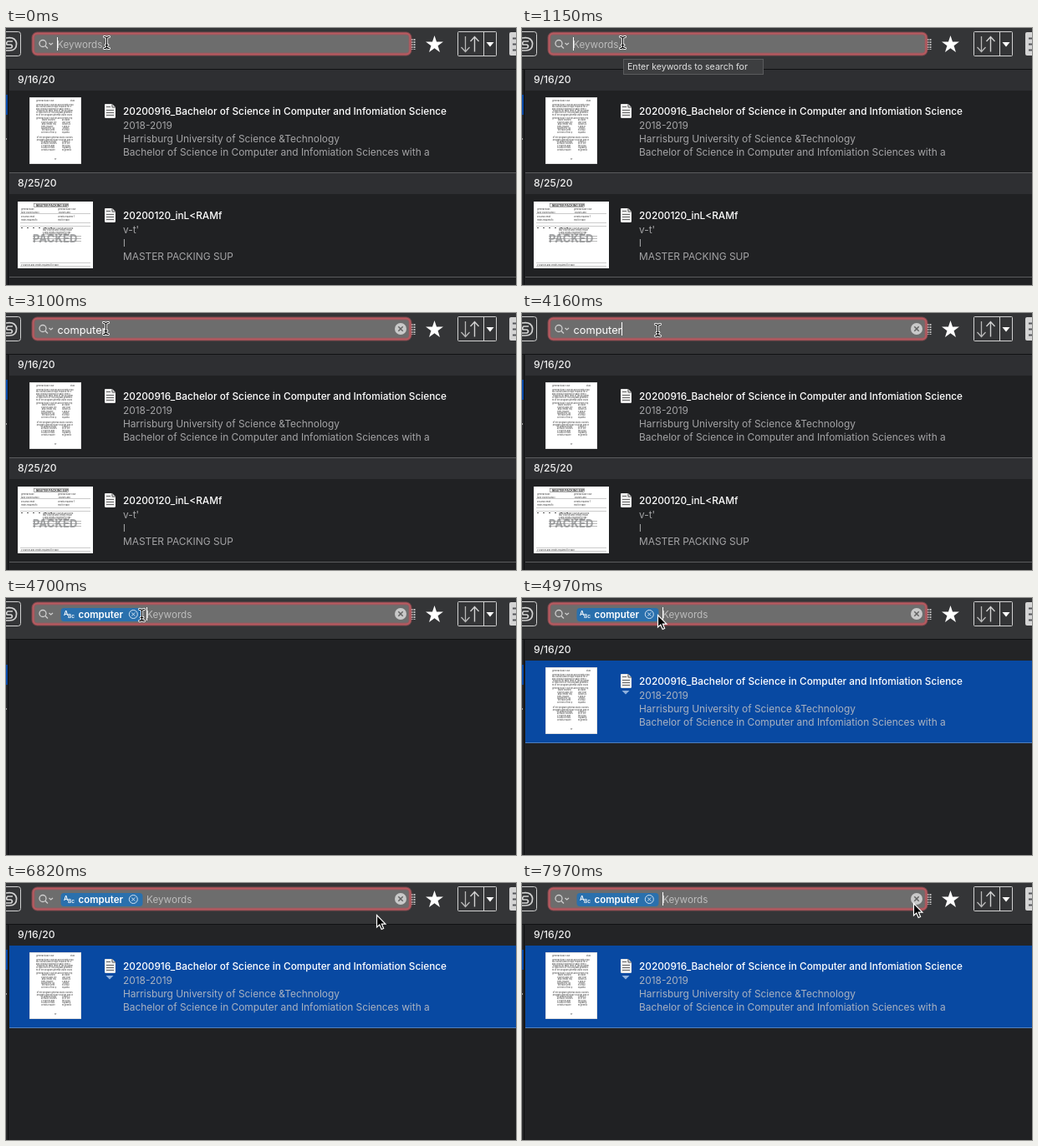
Animation, 610 px wide and 308 px high, one loop 8 s. Source, as an HTML page:

```html
<!DOCTYPE html>
<html lang="en">
<head>
<meta charset="utf-8">
<title>Keyword search</title>
<style>
  html, body { margin: 0; width: 100%; height: 100%; overflow: hidden; background: #202123; }
  svg { display: block; }
  text { font: 11.9px Inter, "Open Sans", sans-serif; fill: #a4a4a6; white-space: pre; }
  .title { font-size: 11.82px; font-weight: 500; fill: #fff; }
  .date { font-size: 12.1px; font-weight: 500; fill: #f2f2f2; }
  .hint { font-size: 11.7px; fill: #bdbdbd; }
  .typed { font-size: 12.8px; fill: #fff; }
  .token { font-size: 11.5px; font-weight: 600; fill: #fff; }
  .tiny { font-size: 2.4px; font-weight: 500; fill: #444; }
  .selected text:not(.title):not(.date):not(.tiny) { fill: #a9b2c1; }
</style>
</head>
<body>
<svg width="610" height="308" viewBox="0 0 610 308">
  <defs>
    <g id="page">
      <path d="M119 91H127L131 95V106.500Q131 108 129.500 108H119.500Q118 108 118 106.500V92Q118 91 119 91Z" fill="#ececec"/>
      <path d="M127 91V95H131" fill="none" stroke="#555"/>
      <path d="M120 94.500H125M120 98.500H129M120 101.500H129M120 104.500H129" stroke="#666"/>
    </g>
  </defs>

  <rect width="610" height="308" fill="#202123"/>
  <rect width="610" height="49" fill="#343537"/>
  <rect y="49" width="610" height="1" fill="#111213"/>
  <rect y="50" width="2" height="258" fill="#28292b"/>
  <rect x="2" y="50" width="1" height="258" fill="#0e0f10"/>
  <rect y="80" width="2" height="24" fill="#0849a8"/>
  <rect y="132" width="1" height="2" fill="#999"/>

  <!-- toolbar -->
  <g fill="none" stroke="#d2d2d2">
    <path d="M0 4.500H14.500Q17.500 4.500 17.500 7.500V30.500Q17.500 33.500 14.500 33.500H0"/>
    <path d="M0 12Q11 10 12.500 18Q13 27 4 27H0M8 16H2Q-1 19 2 20H6Q9 22 6 24H0" stroke-width="1.700"/>
    <rect x="540.500" y="4.500" width="46" height="29" rx="1"/>
    <path d="M571.500 5V33"/>
    <path d="M549.500 10V28M544.500 23L549.500 28.500L554.500 23" stroke="#b8b8b8" stroke-width="1.300"/>
    <path d="M560.500 28.500V10.500M555.500 16L560.500 10.500L565.500 16" stroke-width="1.400"/>
    <path d="M485.500 13V26M488.500 13V26" stroke="#bdbdbd" stroke-width="2" stroke-dasharray="2 1"/>
  </g>
  <path d="M574.500 17H583.500L579 22.500Z" fill="#fff"/>
  <path id="star" fill="#fff"/>
  <rect x="602" y="5" width="12" height="28" rx="2" fill="#d4d4d4"/>
  <path d="M606 12.500H610M606 19.500H610M606 26.500H610" stroke="#55565a" stroke-width="2"/>

  <!-- search field -->
  <rect x="32.500" y="6.500" width="451" height="25" rx="5" fill="#6d6d6d" stroke="#a9545a" stroke-opacity=".6" stroke-width="4"/>
  <rect x="32.500" y="6.500" width="451" height="25" rx="5" fill="none" stroke="#b85a60" stroke-width="2"/>
  <g fill="none" stroke="#cfcfcf" stroke-width="1.300">
    <circle cx="44" cy="18.500" r="4"/>
    <path d="M47 21.500L50 24.500M51.500 18L53.700 20L56 18"/>
  </g>
  <g id="clear">
    <circle cx="472" cy="19" r="7" fill="#c9c9c9"/>
    <path d="M469.300 16.300L474.700 21.700M474.700 16.300L469.300 21.700" stroke="#646464" stroke-width="1.500"/>
  </g>
  <g id="token">
    <rect x="65.500" y="12" width="98" height="16" rx="4" fill="#2a70ad"/>
    <text x="69" y="21" class="token" style="font-size:7.500px">A</text>
    <text x="74" y="24" class="token" style="font-size:6.500px">Bc</text>
    <text x="86.500" y="24" class="token">computer</text>
    <circle cx="152.300" cy="19.500" r="5" fill="none" stroke="#d5e5f4"/>
    <path d="M150.300 17.500L154.300 21.500M154.300 17.500L150.300 21.500" stroke="#d5e5f4"/>
  </g>
  <text id="hint" y="24" class="hint">Keywords</text>
  <text id="typed" x="61.500" y="24.500" class="typed"></text>
  <rect id="caret" y="11" width="1" height="16" fill="#fff"/>

  <!-- results -->
  <g id="first">
    <rect x="4" y="50" width="606" height="25" fill="#2e2f32"/>
    <text x="14" y="66" class="date">9/16/20</text>
    <g id="highlight">
      <rect x="4" y="50" width="606" height="25" fill="#232426" style="mix-blend-mode:darken"/>
      <rect x="4" y="75" width="606" height="99" fill="#0849a2"/>
      <path d="M119.500 111H128.500L124 115.500Z" fill="#8fb0dc"/>
      <text x="14" y="66" class="date">9/16/20</text>
    </g>
    <path id="rule" d="M4 173.500H610" stroke="#5b5c5e"/>
    <rect x="28" y="83" width="62" height="80" fill="#c4c4c4"/>
    <rect x="28.500" y="83.500" width="61" height="79" fill="#fff"/>
    <g id="thumbA"></g>
    <use href="#page"/>
    <text x="140" y="104" class="title">20200916_Bachelor of Science in Computer and Infomiation Science</text>
    <text x="140" y="121">2018-2019</text>
    <text x="140" y="137">Harrisburg University of Science &amp;Technology</text>
    <text x="140" y="153">Bachelor of Science in Computer and Infomiation Sciences with a</text>
  </g>
  <g id="second">
    <rect x="4" y="174" width="606" height="25" fill="#2e2f32"/>
    <text x="14" y="190" class="date">8/25/20</text>
    <path d="M4 298.500H610" stroke="#5b5c5e"/>
    <rect x="14" y="208" width="90" height="80" fill="#fff"/>
    <g id="thumbB">
      <rect x="33.500" y="210.500" width="41" height="4" fill="none" stroke="#777" stroke-width=".6"/>
      <text x="36" y="214" class="tiny" style="font-size:3.400px;font-weight:800">MASTER PACKING SUP</text>
      <path d="M17 222.500H101M17 233.500H101M17 237.500H101M17 281.500H101M17 285.500H101" stroke="#b5b5b5" stroke-width=".7"/>
      <path d="M18 239.500H58" stroke="#555" stroke-dasharray="2 5"/>
      <text x="32" y="257" style="font-size:13px;font-weight:800;fill:#a6a8aa">PACKED</text>
      <path d="M32 249.500H90M32 252.500H90M32 255.500H90" stroke="#8a8a8a" stroke-width=".6"/>
    </g>
    <use href="#page" y="125"/>
    <text x="140" y="229" class="title">20200120_inL&lt;RAMf</text>
    <text x="140" y="246">v-t'</text>
    <text x="140" y="262">l</text>
    <text x="140" y="278">MASTER PACKING SUP</text>
  </g>

  <g id="tooltip">
    <rect x="121.500" y="37.500" width="167" height="18" fill="#3d3e40" stroke="#5a5b5d"/>
    <text x="126" y="50" style="font-size:10.600px;fill:#e2e2e2">Enter keywords to search for</text>
  </g>

  <g id="beam" fill="none" stroke-linecap="round">
    <path d="M-3 -7Q0 -7 0 -5V5Q0 7 -3 7M3 -7Q0 -7 0 -5M0 5Q0 7 3 7M-1.500 3H1.500" stroke="#fff" stroke-width="2.800"/>
    <path d="M-3 -7Q0 -7 0 -5V5Q0 7 -3 7M3 -7Q0 -7 0 -5M0 5Q0 7 3 7M-1.500 3H1.500" stroke="#000" stroke-width="1.100"/>
  </g>
  <path id="arrow" d="M0 0V14.500L3.300 11.500L5.700 17L8.100 16L5.800 10.600H10.400Z" fill="#000" stroke="#fff" stroke-width="1.200"/>
</svg>
<script>
const LOOP = 8000, STEP = 86;
const $ = id => document.getElementById(id);

const WORD = "computer";
const keyTimes = [1420, 1680, 1860, 2130, 2390, 2660, 2830, 3100];
const caretToggles = [260, 800, 3640, 4160, 5230, 5770, 6310, 6850, 7440, 7970];
const moves = [
  { at: 2480, steps: 1, to: [120, 18] },
  { at: 2830, steps: 1, to: [119, 18] },
  { at: 3640, steps: 7, to: [162, 20] },
  { at: 5770, steps: 6, to: [242, 45] },
  { at: 6300, steps: 4, to: [437, 41] },
  { at: 6650, steps: 7, to: [468, 24] }
];

$("star").setAttribute("d", "M" + Array.from({ length: 10 }, (_, i) => {
  const r = i % 2 ? 4.3 : 11, a = (i / 5 - 0.5) * Math.PI;
  return [512.5 + r * Math.cos(a), 20 + r * Math.sin(a)].map(v => v.toFixed(2));
}).join("L") + "Z");

function tinyLine(parent, x, y, length, offset) {
  const filler = "general study courses and credits required for each term of the program ";
  const line = document.createElementNS("http://www.w3.org/2000/svg", "text");
  line.setAttribute("class", "tiny");
  line.setAttribute("x", x);
  line.setAttribute("y", y);
  line.textContent = (filler + filler).substr(offset % filler.length, length);
  parent.append(line);
}

const thumbA = $("thumbA"), thumbB = $("thumbB");
tinyLine(thumbA, 36, 88, 18, 0);
tinyLine(thumbA, 77, 88, 4, 8);
for (let i = 0; i < 6; i++) tinyLine(thumbA, 36, 93 + i * 2.3, 38 - i % 3, i * 11);
for (let i = 0; i < 15; i++) {
  const y = 109 + i * 2.4 + (i > 7 ? 4 : 0);
  if (i === 0 || i === 8 || i === 9) {
    tinyLine(thumbA, 36, y, 37, i * 7);
  } else {
    tinyLine(thumbA, 42, y, 13 + i % 4, i * 7);
    tinyLine(thumbA, 67, y, 8, i * 5);
  }
}
tinyLine(thumbA, 58, 158, 2, 3);
for (let i = 0; i < 4; i++) {
  const y = 218 + i * 3.6 + (i > 1 ? 2 : 0);
  tinyLine(thumbB, 18, y, 14 + i % 2 * 4, i * 9);
  tinyLine(thumbB, 62, y, 18 - i % 2 * 5, i * 13);
  tinyLine(thumbB, 44, 241 + i * 2.4, 30, i * 10);
}
tinyLine(thumbB, 18, 284.5, 40, 12);

const show = (id, on) => { $(id).style.display = on ? "" : "none"; };
const ease = p => p * p * (3 - 2 * p);

function pointerAt(t) {
  let pos = [120, 17];
  for (const { at, steps, to } of moves) {
    if (t < at) break;
    const step = Math.min(steps, Math.floor((t - at) / STEP) + 1);
    const p = ease(step / steps);
    pos = pos.map((v, i) => v + (to[i] - v) * p);
  }
  return pos.map(Math.round);
}

function draw(t) {
  const searching = t >= 4700, found = t >= 4970;
  const typedCount = searching ? 0 : keyTimes.filter(k => t >= k).length;
  const empty = typedCount === 0;

  $("typed").textContent = WORD.slice(0, typedCount);
  const start = searching ? 168 : 61;
  show("hint", empty);
  $("hint").setAttribute("x", start);
  const typedWidth = empty ? 0 : $("typed").getComputedTextLength();
  $("caret").setAttribute("x", start + Math.round(typedWidth));
  show("caret", caretToggles.filter(k => t >= k).length % 2 === 0);

  show("clear", t >= 1420);
  show("tooltip", t >= 1150 && t < 1420);
  show("token", searching);
  show("first", !searching || found);
  show("second", !searching);
  show("highlight", found);
  $("first").setAttribute("class", found ? "selected" : "");
  $("rule").setAttribute("stroke", found ? "#4f7fbd" : "#5b5c5e");

  const arrow = found && !(t >= 5150 && t < 5410);
  const [x, y] = pointerAt(t);
  show("arrow", arrow);
  show("beam", !arrow);
  $(arrow ? "arrow" : "beam").setAttribute("transform", `translate(${x + 0.5} ${y + 0.5})`);
}

const began = performance.now();
function tick() {
  draw((performance.now() - began) % LOOP);
  requestAnimationFrame(tick);
}
tick();
</script>
</body>
</html>
```
